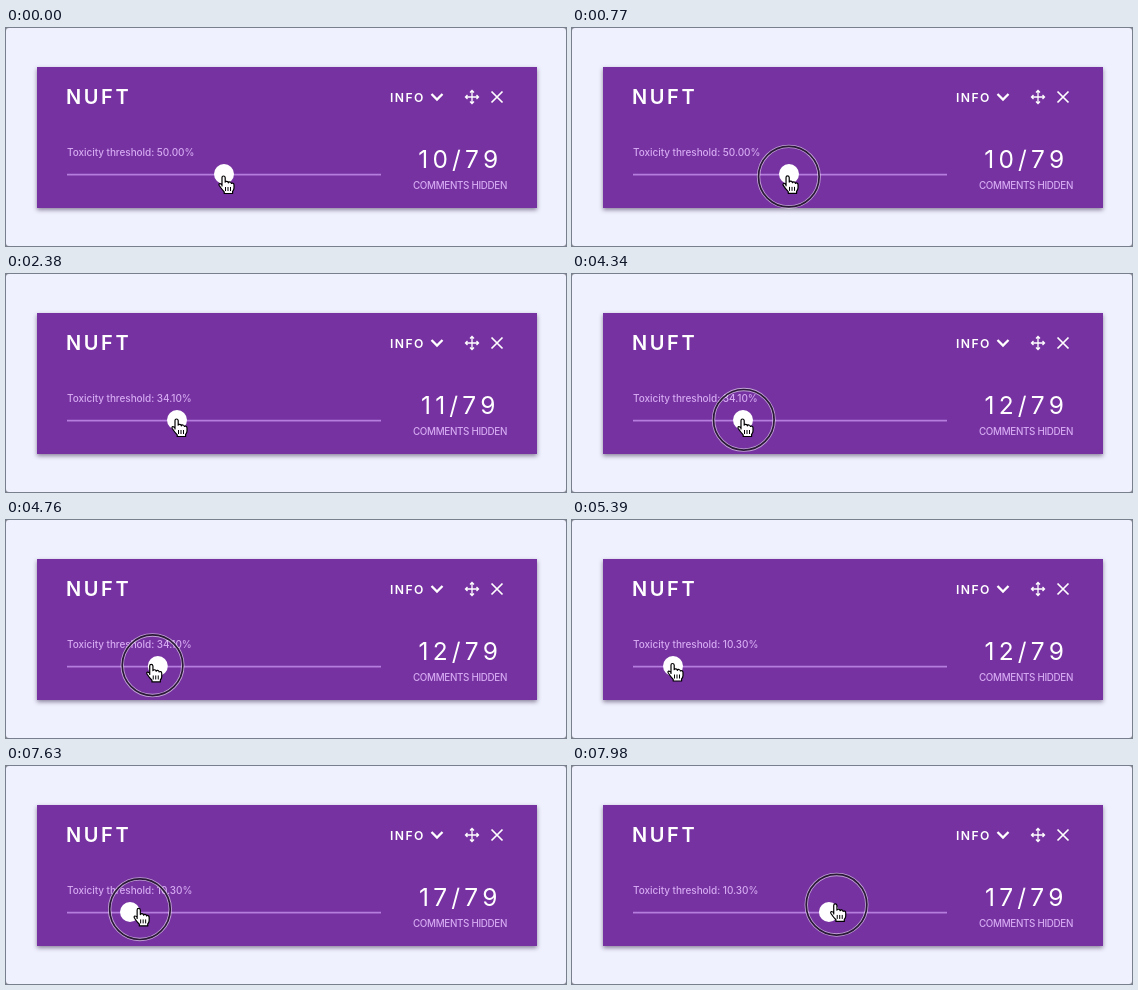
An HTML page that plays this animation: 560x218 px, repeating every 8 s.

```html
<!DOCTYPE html>
<html lang="en">
<head>
<meta charset="utf-8">
<title>Comment filter slider</title>
<style>
  html, body { margin: 0; width: 100%; height: 100%; overflow: hidden; background: #8a8a92; }
  svg { display: block; width: 560px; height: 218px; background: #eff1fe; border-radius: 3px; }
  text { font-family: Inter, "Open Sans", sans-serif; fill: #fff; }
  .soft { fill: #d6aaf2; font-weight: 500; }
  .card { fill: #7532a0; filter: drop-shadow(0 2px 2px rgba(40, 20, 60, .5)); }
  .icon { fill: none; stroke: #fff; }
</style>
</head>
<body>
<svg viewBox="0 0 560 218">
  <rect class="card" x="31" y="39" width="500" height="141"/>
  <text x="60" y="76" font-size="20" font-weight="600" letter-spacing="2.6">NUFT</text>
  <text x="384" y="73.5" font-size="12.2" font-weight="600" letter-spacing="1.4">INFO</text>
  <path class="icon" stroke-width="2.3" d="M425.5 66l5.5 5.5 5.5-5.5"/>
  <path class="icon" stroke-width="1.3" d="M459.5 69h13M466 62.5v13M464 64.5l2-2 2 2M464 73.5l2 2 2-2M461.5 67l-2 2 2 2M470.5 67l2 2-2 2"/>
  <path class="icon" stroke-width="1.7" d="M485.5 63.5l11 11M496.5 63.5l-11 11"/>
  <text class="soft" id="level" x="61" y="127.5" font-size="10" letter-spacing="-.05"></text>
  <text id="count" x="454.3" y="140.3" font-size="24.5" letter-spacing="4.2" text-anchor="middle"></text>
  <text class="soft" x="454" y="161" font-size="9.8" letter-spacing="-.3" text-anchor="middle">COMMENTS HIDDEN</text>
  <path d="M61 146.7H375" stroke="#b57ddd" stroke-width="1.8"/>
  <circle id="thumb" cy="146" r="10" fill="#fff"/>
  <g id="pointer">
    <g id="ring" fill="none" transform="translate(.8 .8)">
      <circle r="30.3" stroke="#fff" stroke-opacity=".55" stroke-width="3.4"/>
      <circle r="30.3" stroke="#2a1a38" stroke-width="1.7"/>
    </g>
    <path fill="#fff" stroke="#000" stroke-width="1.2" stroke-linejoin="round"
      d="M-2 10V1.6Q-2 0-.5 0T1.2 1.6V6.2Q1.4 5.2 2.8 5.3T4.4 6.8Q4.8 5.8 6 6T7.4 7.5Q8 6.8 9 7.2T10 9V12Q10 14 8.6 15.4V17.5H.2V15.8Q-2.6 13-4.6 9.8Q-5.6 8-4.3 7.6Q-3.2 7.4-2 9Z"/>
    <path stroke="#000" d="M1.5 11v4M4 11v4M6.5 11v4"/>
  </g>
</svg>
<script>
const $ = id => document.getElementById(id);
const LOOP = 8000, STEP = 70, FADE = 210;
const ramp = (t, a, b) => Math.min(1, Math.max(0, (t - a) / (b - a)));
const ease = (t, a, b) => {
  const u = ramp(t, a, b) ** 1.3;
  return u * u * (3 - 2 * u);
};
const fade = (t, start) => ramp(t, start, start + FADE);

// Start time and number of hidden comments
const counts = [[0, 10], [2380, 11], [2940, 12], [6230, 13], [6300, 14], [6370, 16], [6440, 17]];

// The first two drags go left; the third accelerates to the right
const dragX = t => 218 - 47 * ease(t, 560, 1610) - 70 * ease(t, 4340, 5180);

function draw(t) {
  const pull = Math.max(0, t - 7350) / 1000;
  const x = dragX(t) + 410 * pull ** 2;
  const y = 148 - 3 * ease(t, 560, 1610) - 1.5 * ease(t, 4340, 5180) - 14 * pull ** 2;
  $("pointer").setAttribute("transform", `translate(${x} ${y})`);
  $("thumb").setAttribute("cx", dragX(t - 50) + 464 * pull ** 2.36);
  $("ring").setAttribute("opacity",
    fade(t, 0) - fade(t, 1610) + fade(t, 3990) - fade(t, 5180) + fade(t, 7140));
  const level = t < 1610 ? "50.00" : t < 5180 ? "34.10" : "10.30";
  $("level").textContent = `Toxicity threshold: ${level}%`;
  $("count").textContent = counts.filter(c => t >= c[0]).pop()[1] + "/79";
}

const origin = performance.now();
function tick() {
  const t = (performance.now() - origin) % LOOP;
  draw(Math.floor(t / STEP) * STEP);
  requestAnimationFrame(tick);
}
tick();
</script>
</body>
</html>
```
